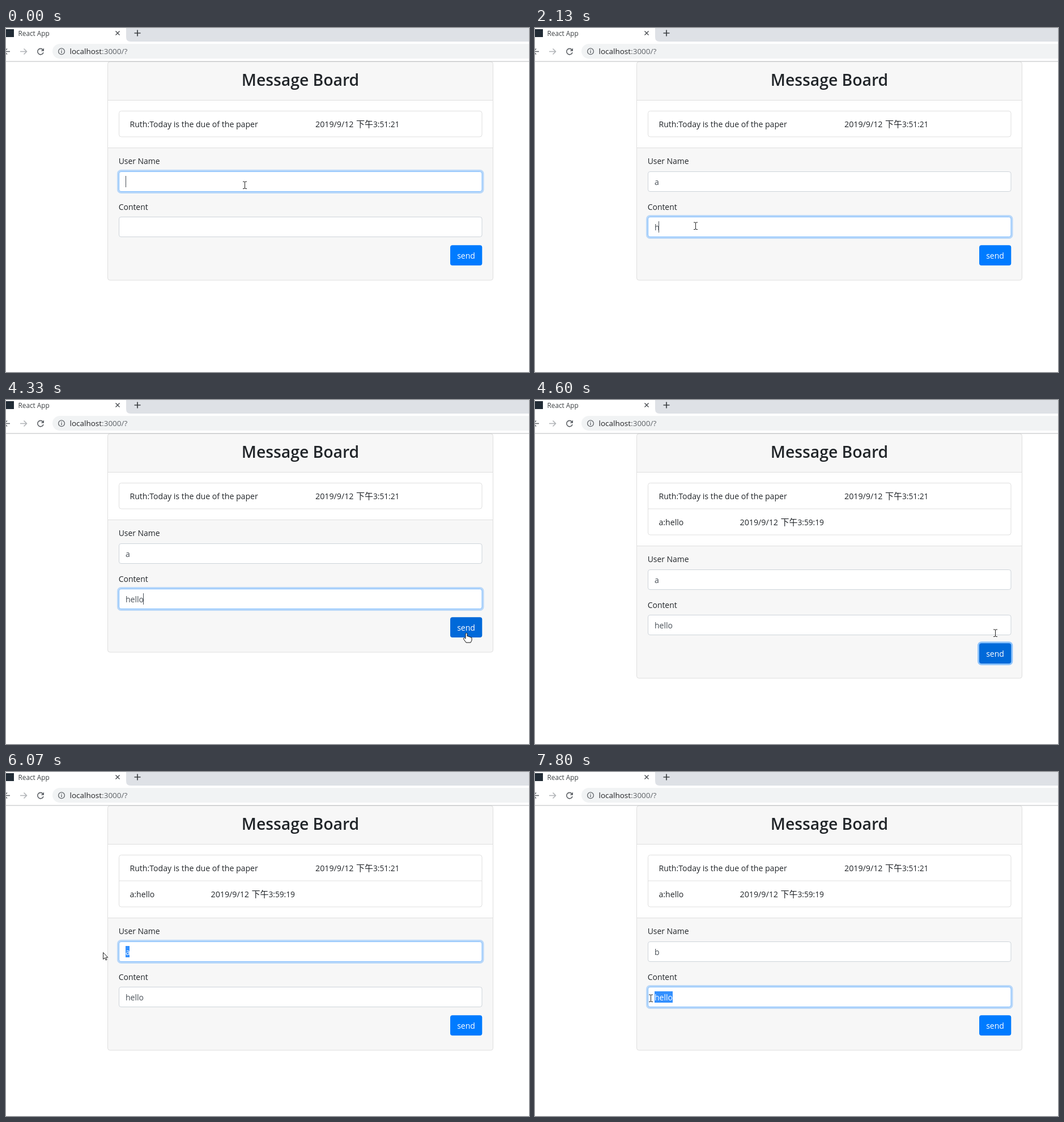
Write an HTML page that moves like this. It is 923 px wide and 607 px high and loops after 8000 ms.

```html
<!DOCTYPE html>
<html lang="en">
<head>
<meta charset="utf-8">
<title>Message Board</title>
<style>
  html, body { margin: 0; width: 100%; height: 100%; overflow: hidden; background: #fff; }
  svg { display: block; }
  text { font-family: "Open Sans", "Noto Sans", sans-serif; white-space: pre; }
  .cjk { font-family: "Noto Sans CJK SC", "Noto Sans CJK JP", "Noto Sans CJK", sans-serif; }
</style>
</head>
<body>
<svg id="stage" width="923" height="607" viewBox="0 0 923 607">
  <g id="page"></g>
  <g id="browser"></g>
  <g id="pointer"></g>
</svg>
<script>
const LOOP = 8000;
const FADE = 150;
const SENT = 4530;
const SHIFT = 46;
const INK = '#212529';
const $ = id => document.getElementById(id);

const text = (x, y, size, str, fill = INK, extra = '') =>
  `<text x="${x}" y="${y}" font-size="${size}" fill="${fill}" ${extra}>${str}</text>`;
const rect = (x, y, w, h, fill, extra = '') =>
  `<rect x="${x}" y="${y}" width="${w}" height="${h}" fill="${fill}" ${extra}/>`;
const line = (d, stroke, width = 1) =>
  `<path d="${d}" fill="none" stroke="${stroke}" stroke-width="${width}"/>`;

const clamp = v => Math.max(0, Math.min(1, v));
const smooth = v => (v = clamp(v), v * v * (3 - 2 * v));
const mix = (a, b, p) =>
  `rgb(${a.map((v, i) => Math.round(v + (b[i] - v) * p))})`;

// Last entry of a [time, ...] list that has begun
const latest = (list, t) => list.filter(e => e[0] <= t).pop();

// Fades 0..1 and back at alternating switch times
function fade(t, switches, level = 0) {
  let p = level;
  for (const s of switches) {
    const k = smooth((t - s) / FADE);
    p = level ? 1 - k : k;
    if (t < s + FADE) return t < s ? level : p;
    level = 1 - level;
  }
  return level;
}

const names = [[0, ''], [270, 'a'], [6530, 'b']];
const contents = [[0, ''], [2130, 'h'], [2270, 'he'], [2800, 'hel'], [2930, 'hell'], [3070, 'hello']];

// start, end, x, field
const carets = [
  [0, 270, 211, 0], [330, 800, 218, 0], [1360, 1865, 211, 1],
  [2130, 2270, 218, 1], [2270, 2800, 227, 1], [2800, 2930, 230, 1],
  [2930, 3070, 233, 1], [3070, 3595, 242, 1], [4130, 4450, 242, 1],
  [5430, 5795, 218, 0], [6530, 7060, 219, 0], [7165, 7350, 242, 1]
];

// start, end, x, y, control x, control y
const moves = [
  [820, 1290, 283, 349, 345, 320],
  [3770, 4200, 812, 411, 820, 520],
  [4630, 5130, 350, 325, 600, 340],
  [5240, 5410, 303, 319, 325, 321],
  [5770, 6060, 171, 318, 240, 318],
  [6640, 7130, 270, 397, 200, 385],
  [7310, 7460, 178, 398, 225, 397],
  [7690, 7800, 204, 399, 192, 399]
];

function pointerAt(t) {
  let x = 421, y = 277;
  for (const [t0, t1, ex, ey, cx, cy] of moves) {
    if (t < t0) break;
    const p = smooth((t - t0) / (t1 - t0)), q = 1 - p;
    x = q * q * x + 2 * p * q * cx + p * p * ex;
    y = q * q * y + 2 * p * q * cy + p * p * ey;
    if (t < t1) break;
  }
  return [Math.round(x), Math.round(y)];
}

function pointer(x, y, dy) {
  const inBox = (l, top, r, b) => x >= l && x <= r && y >= top + dy && y <= b + dy;
  let shape;
  if (inBox(199, 253, 841, 289) || inBox(199, 333, 841, 369)) {
    shape = line('M-3 -6H-1Q.5 -6 .5 -4.5V4.5Q.5 6.5 -1 6.5H-3M4 -6H2Q.5 -6 .5 -4.5V4.5Q.5 6.5 2 6.5H4', '#222');
  } else if (inBox(784, 383, 840, 419)) {
    shape = '<path d="M-1 1Q.5 -1 2 1V6Q4 5 5 7Q7 6 8 8Q10 7 10 9V13L8 17H0L-5 10Q-4 7 -1 10Z" fill="#fff" stroke="#111"/>';
  } else {
    shape = '<path d="M.5 .5V12.5L3.3 9.8L5.2 14L7 13.2L5.2 9.2H8.8Z" fill="#fff" stroke="#222"/>';
  }
  return `<g transform="translate(${x} ${y})">${shape}</g>`;
}

function field(y, value, focus, sel) {
  const s = 3 * focus;
  const border = mix([206, 212, 218], [128, 189, 255], focus);
  let out = rect(199 - s, y - s, 641.5 + 2 * s, 36 + 2 * s, '#007bff', `rx="${4 + s}" opacity="${0.25 * focus}"`)
    + rect(199.5, y + .5, 640.5, 35, '#fff', `rx="3.5" stroke="${border}"`)
    + text(211, y + 24, 14, value, '#495057');
  if (sel) {
    const [x0, x1] = sel;
    out += `<svg x="${x0}" y="${y + 8}" width="${x1 - x0}" height="20" overflow="hidden">`
      + rect(0, 0, x1 - x0, 20, '#3390ff') + text(211 - x0, 16, 14, value, '#fff') + '</svg>';
  }
  return out;
}

const message = (y, body, x, time) =>
  text(218.5, y, 14.1, body) + text(x, y, 14.25, '2019/9/12')
  + text(x + 72, y, 15, '下午', INK, 'class="cjk"') + text(x + 102, y, 13.7, time);

function selection(t, x) {
  if (t >= 5800 && t < 6530 && x < 215) return [0, [211, 218]];
  if (t >= 7310 && x < 240) {
    const from = t > 7460 ? 211 : Math.max(211, x);
    return [1, [from, 243]];
  }
  return [-1];
}

function page(t, x) {
  const sent = t >= SENT, dy = sent ? SHIFT : 0;
  const [selField, sel] = selection(t, x);
  const ring = fade(t, [4450, 5430]);
  const hover = fade(t, [4165, 4630]);
  const s = 3 * ring;
  const caret = carets.find(c => t >= c[0] && t < c[1]);

  return rect(179.5, 59.5, 680, 385.5 + dy, '#f7f7f7', 'rx="4" stroke="#dfdfdf"')
    + rect(180, 127, 679, 84 + dy, '#fff')
    + line(`M180 127.5H859M180 ${211.5 + dy}H859`, '#dfdfdf')
    + text(519.5, 101.5, 28.3, 'Message Board', INK, 'font-weight="600" text-anchor="middle"')
    + rect(199.5, 146.5, 640.5, 45.5 + dy, '#fff', 'rx="4" stroke="#dfdfdf"')
    + message(175, 'Ruth:Today is the due of the paper', 546, '3:51:21')
    + (sent ? line('M200 192H840', '#dfdfdf') + message(221, 'a:hello', 361.5, '3:59:19') : '')
    + `<g transform="translate(0 ${dy})">`
    + text(198.7, 240, 13.95, 'User Name')
    + field(253, latest(names, t)[1], fade(t, [1360, 5430, 7170], 1), selField === 0 && sel)
    + text(198.7, 320.5, 13.95, 'Content')
    + field(333, latest(contents, t)[1], fade(t, [1360, 4450, 7170]), selField === 1 && sel)
    + (caret && selField < 0 ? rect(caret[2], caret[3] ? 341 : 261, 1, 20, '#495057') : '')
    + rect(784 - s, 383.3 - s, 56.3 + 2 * s, 35.7 + 2 * s, '#268fff', `rx="${4 + s}" opacity="${0.5 * ring}"`)
    + rect(784, 383.3, 56.3, 35.7, mix([0, 123, 255], [0, 105, 217], hover), 'rx="4"')
    + text(812, 407, 14, 'send', '#fff', 'text-anchor="middle"')
    + '</g>';
}

function browser() {
  const grey = '#5f6368';
  return rect(0, 0, 923, 24, '#dee1e6')
    + rect(0, 24, 923, 35, '#fff')
    + '<path d="M0 0H212V16Q212 24 220 24H0Z" fill="#fff"/>'
    + rect(0, 2, 14, 14, '#222c36')
    + text(21.5, 14, 11.8, 'React App', '#3c4043')
    + line('M193.5 5.5L200.5 12.5M200.5 5.5L193.5 12.5', '#45494d', 1.4)
    + line('M226.5 9H237.5M232 3.5V14.5', '#3c4043', 1.7)
    + line('M7 41.5H-3M2 36.5L-3 41.5L2 46.5', grey, 1.5)
    + line('M25 41.5H36.5M31.5 36.5L36.5 41.5L31.5 46.5', '#b0b3b6', 1.5)
    + line('M65 38.3A5.2 5.2 0 1 0 66 43', grey, 1.6)
    + `<path d="M67 35.5V40.8H61.7Z" fill="${grey}"/>`
    + rect(82, 28, 880, 26, '#f1f3f4', 'rx="13"')
    + `<circle cx="98" cy="41.3" r="5.4" fill="none" stroke="${grey}" stroke-width="1.3"/>`
    + line('M98 40.6V44.3M98 38.2V39.6', grey, 1.4)
    + text(112.5, 46, 13.5, `localhost<tspan fill="${grey}">:3000/?</tspan>`, '#202124')
    + rect(0, 58.5, 923, 1, '#b9bbbe');
}

let shown = '';
function render(t) {
  const [x, y] = pointerAt(t);
  const markup = page(t, x);
  if (markup !== shown) $('page').innerHTML = shown = markup;
  $('pointer').innerHTML = pointer(x, y, t >= SENT ? SHIFT : 0);
}

$('browser').innerHTML = browser();
const start = performance.now();
function tick() {
  render((performance.now() - start) % LOOP);
  requestAnimationFrame(tick);
}
tick();
</script>
</body>
</html>
```
